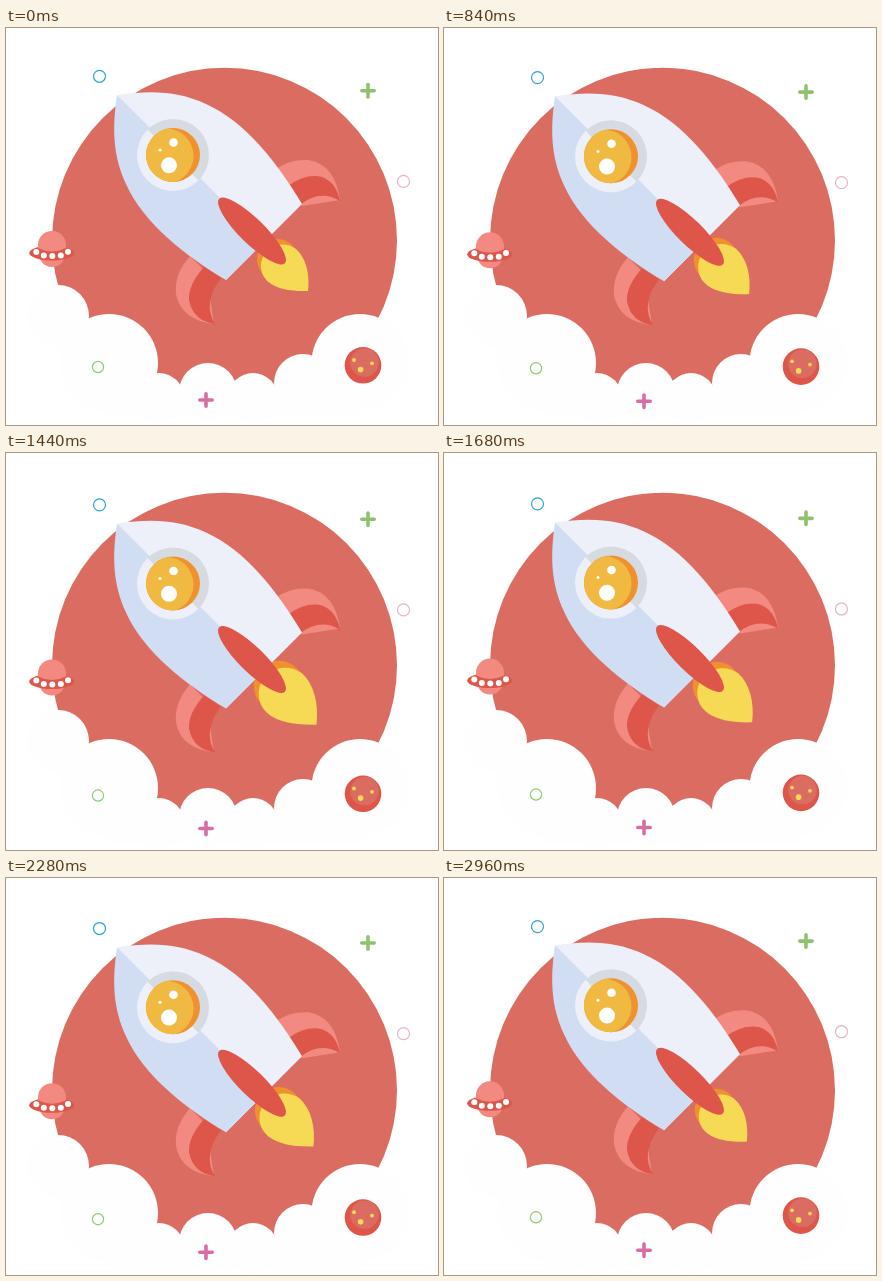
Write an HTML page that moves like this. It is 432 px wide and 397 px high and loops after 3 s.

```html
<!DOCTYPE html>
<html lang="en">
<head>
<meta charset="utf-8">
<title>Rocket</title>
<style>
  html, body { margin: 0; width: 100%; height: 100%; overflow: hidden; background: #fff; }
  svg { display: block; width: 432px; height: 397px; }
  .sky { fill: #db6c61; }
  .red { fill: #dd5649; }
  .rose { fill: #f28a81; }
  .cloud { fill: #fefefe; }
  .pale { fill: #edf0f8; }
  .blue { fill: #d1ddf2; }
  .orange { fill: #f0912f; }
  .gold { fill: #f0b942; }
  .lemon { fill: #f6d955; }
  .white { fill: #fff; }
  .line { fill: none; stroke-linecap: round; }
</style>
</head>
<body>
<svg viewBox="0 0 432 397">
  <defs>
    <clipPath id="glass"><circle cx="167" cy="127" r="27"/></clipPath>
  </defs>

  <circle class="sky" cx="218.5" cy="212.3" r="172.5"/>
  <g id="clouds" class="cloud"><rect x="100" y="364" width="256" height="26"/></g>

  <g class="bob">
    <!-- fins -->
    <path class="rose" d="M270 141Q284 131 302 132Q329 136 334 172L296 178Z"/>
    <path class="red" d="M282 158Q300 145 316 149Q330 154 334 173Q314 161 294 177Z"/>
    <path class="rose" d="M184 228Q168 246 170 266Q175 292 208 296L200 244Z"/>
    <path class="red" d="M198 239Q182 257 183 272Q187 293 209 296Q196 275 215 250Z"/>
  </g>

  <g id="flame">
    <circle class="orange" cx="271.5" cy="231.5" r="20.5"/>
    <path class="lemon" d="M302 263C304 246 300 230 290 221C276 211 257 219 255 236C254 252 267 264 302 263Z"/>
  </g>

  <g class="bob">
    <!-- body -->
    <path class="pale" d="M111 67C145 62 172 63 200 76C240 94 272 136 296 176L220 252Z"/>
    <path class="blue" d="M111 67C106 101 107 128 120 156C138 196 180 228 220 252L258 214Z"/>

    <!-- window -->
    <circle cx="167" cy="127" r="36" fill="#d6dbe1"/>
    <path class="pale" d="M141.5 101.5A36 36 0 0 0 192.5 152.5Z"/>
    <circle class="orange" cx="167" cy="127" r="27"/>
    <circle class="gold" cx="160" cy="128" r="27.5" clip-path="url(#glass)"/>
    <circle class="white" cx="167.5" cy="114.5" r="4.3"/>
    <circle class="white" cx="163" cy="137.3" r="8"/>
    <circle class="white" cx="154" cy="122" r="1.5"/>

    <ellipse class="red" cx="246" cy="203" rx="46" ry="12.5" transform="rotate(44.5 246 203)"/>

    <!-- saucer -->
    <circle class="rose" cx="46" cy="226" r="13"/>
    <ellipse class="red" cx="45.7" cy="225" rx="22.5" ry="7.5"/>
    <path class="rose" d="M32 217a14 14 0 0 1 28 0L60 220Q46 227 32 220Z"/>
    <g id="lamps" class="white"></g>

    <!-- small planet -->
    <circle class="red" cx="357" cy="337.3" r="18.3"/>
    <circle class="sky" cx="358.5" cy="334.5" r="14.3"/>
    <circle class="lemon" cx="348" cy="332" r="1.9"/>
    <circle class="lemon" cx="366" cy="335.3" r="1.9"/>
    <circle class="lemon" cx="354.6" cy="341.6" r="2.8"/>

    <!-- sparkles -->
    <g class="line" stroke-width="3.6">
      <path stroke="#8dc26f" d="M355.8 62.8h12.4m-6.2-6.2v12.4"/>
      <path stroke="#d86ca4" d="M193.8 372h12.4m-6.2-6.2v12.4"/>
    </g>
    <g class="line" stroke-width="1.2">
      <circle cx="93.5" cy="48.3" r="6" stroke="#2ba3d8"/>
      <circle cx="397.5" cy="153.4" r="6" stroke="#eab2c6"/>
      <circle cx="92" cy="339" r="5.6" stroke="#8fca70"/>
    </g>
  </g>
</svg>
<script>
  const LOOP = 3000, STEP = 40, PERIOD = 1000;
  const RISE = 4, GROW = 0.26;

  function addCircles(id, list) {
    const parent = document.getElementById(id);
    for (const [cx, cy, r] of list) {
      const c = document.createElementNS(parent.namespaceURI, 'circle');
      c.setAttribute('cx', cx);
      c.setAttribute('cy', cy);
      c.setAttribute('r', r);
      parent.append(c);
    }
  }

  addCircles('clouds', [
    [52, 288, 31], [103, 335, 49], [153, 370, 25], [202, 364, 29],
    [247, 370, 25], [297, 355, 29], [354, 334.5, 48.5]
  ]);
  addCircles('lamps', [
    [30.3, 224, 3], [37.8, 227.4, 3], [46.3, 228, 3], [54.8, 227.4, 3], [62, 223.8, 3]
  ]);

  const bobs = document.querySelectorAll('.bob');
  const flame = document.getElementById('flame');
  const start = performance.now();

  function draw(now) {
    const t = Math.floor((Math.max(0, now - start) % LOOP) / STEP) * STEP;
    const phase = (t % PERIOD) / PERIOD;
    const p = 1 - Math.abs(1 - 2 * phase);   // linear down and back up
    for (const g of bobs) g.setAttribute('transform', `translate(0 ${RISE * p})`);
    flame.setAttribute('transform',
      `translate(265 225) scale(${1 + GROW * p}) translate(-265 -225)`);
    requestAnimationFrame(draw);
  }
  draw(start);
</script>
</body>
</html>
```
